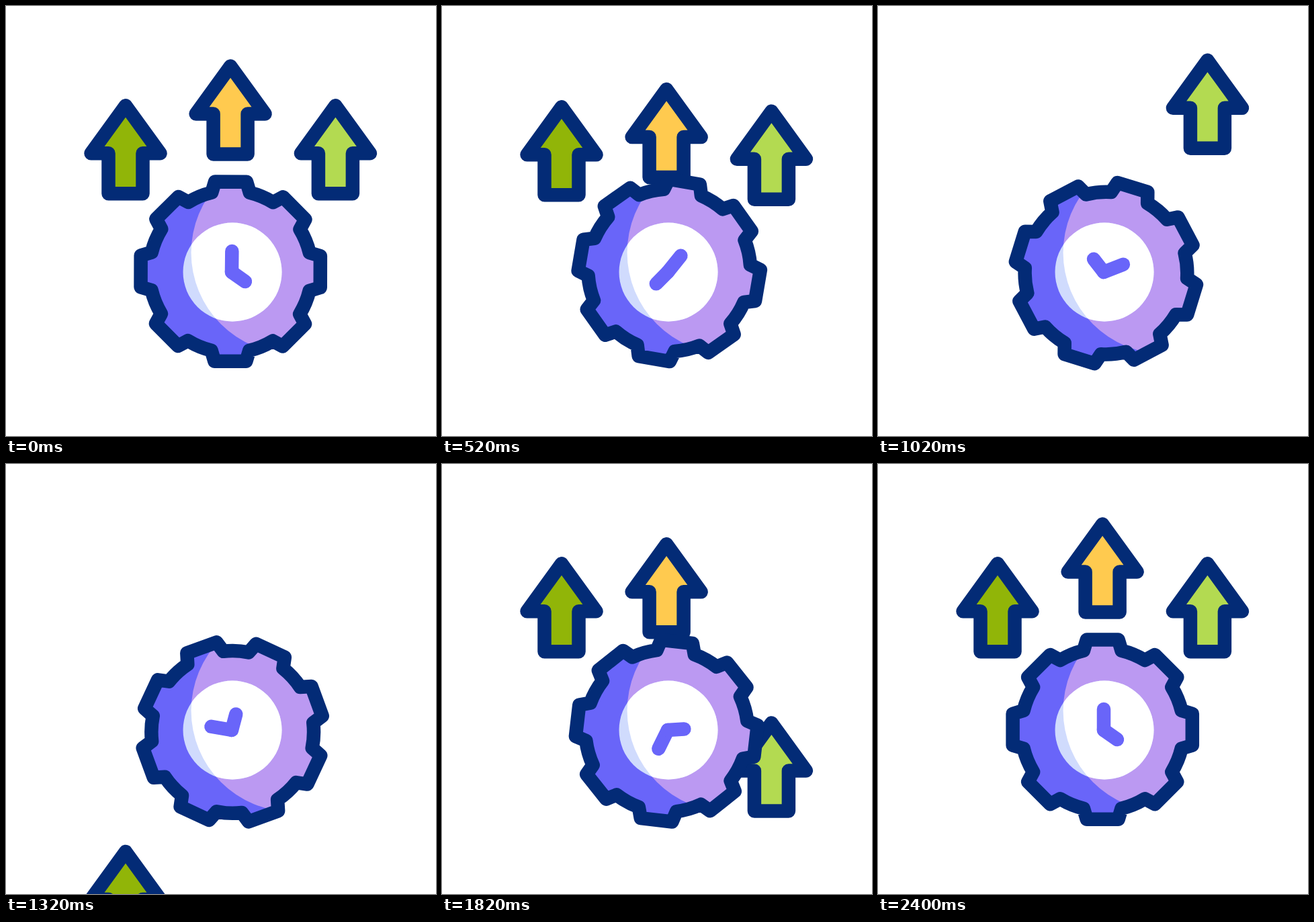
An HTML page that plays this animation: 640 px wide and 640 px high, repeating every 2.42 s.

```html
<!DOCTYPE html>
<html lang="en">
<head>
<meta charset="utf-8">
<title>Gear clock with rising arrows</title>
<style>
  html, body { margin: 0; width: 100%; height: 100%; overflow: hidden; background: #fff; }
  svg { display: block; width: 100%; height: 100%; }
  .line { stroke: #032b76; stroke-width: 20.5; stroke-linejoin: round; stroke-linecap: round; }
  .hand { fill: none; stroke: #6965f9; stroke-width: 20.5; stroke-linecap: round; }
</style>
</head>
<body>
<svg viewBox="0 0 640 640" xmlns="http://www.w3.org/2000/svg">
  <defs>
    <path id="arrow" d="M0 0L51.5 71H25.5V131H-25.5V71H-51.5Z"/>
    <path id="gear"/>
    <clipPath id="gearClip"><use href="#gear"/></clipPath>
    <clipPath id="lightClip"><circle cx="426" cy="367" r="150.4"/></clipPath>
  </defs>
  <use class="line arrow" href="#arrow" fill="#91b508"/>
  <use class="line arrow" href="#arrow" fill="#ffca4f"/>
  <use class="line arrow" href="#arrow" fill="#b3da51"/>
  <g clip-path="url(#gearClip)">
    <rect width="640" height="640" fill="#6965f9"/>
    <circle cx="426" cy="367" r="150.4" fill="#bb99f2"/>
  </g>
  <circle cx="337" cy="396" r="73.5" fill="#d0dbfd"/>
  <circle cx="337" cy="396" r="73.5" fill="#fff" clip-path="url(#lightClip)"/>
  <use class="line" href="#gear" fill="none"/>
  <path id="minute" class="hand" d="M336 396V365"/>
  <path id="hour" class="hand" d="M336 396L356 410"/>
</svg>
<script>
const LOOP = 2420, TURN = 2400, STAGGER = 200;
const DIP = 38.5, TOP = -306.5, BOTTOM = 580;
const $ = id => document.getElementById(id);
const arrows = [...document.querySelectorAll('.arrow')];
const homes = [[178, 148.3], [334.1, 89.5], [490.4, 148.3]];

// Cubic Bezier easing, solved by bisection
function bezier(x1, y1, x2, y2) {
  const at = (a, b, t) => 3 * (1 - t) ** 2 * t * a + 3 * (1 - t) * t * t * b + t ** 3;
  return u => {
    if (u <= 0) return 0;
    if (u >= 1) return 1;
    let lo = 0, hi = 1;
    for (let i = 0; i < 30; i++) {
      const mid = (lo + hi) / 2;
      if (at(x1, x2, mid) < u) lo = mid; else hi = mid;
    }
    return at(y1, y2, lo);
  };
}
const smooth = bezier(1 / 3, 0, 2 / 3, 1);
const spin = bezier(1 / 6, 1 / 6, 2 / 3, 1);
const arrive = bezier(0.65, 0, 0.335, 1);

function gearPath() {
  const tooth = [[-28.3, -117.5], [-23.5, -133.6], [23.5, -133.6], [28.3, -117.5]];
  let d = '';
  for (let k = 0; k < 8; k++) {
    const c = Math.cos(k * Math.PI / 4), s = Math.sin(k * Math.PI / 4);
    tooth.forEach(([x, y], i) => {
      const cmd = i ? 'L' : k ? 'A121 121 0 0 1 ' : 'M';
      d += cmd + (334.2 + x * c - y * s).toFixed(2) + ' ' + (395.2 + x * s + y * c).toFixed(2);
    });
  }
  return d + 'A121 121 0 0 1 305.9 277.7Z';
}

// Vertical offset of an arrow: dip, launch upwards, return from below
function lift(t) {
  if (t < 400) return DIP * smooth(t / 400);
  if (t < 1000) return DIP + (TOP - DIP) * smooth((t - 400) / 600);
  return BOTTOM * (1 - arrive((t - 1000) / 800));
}

function draw(t) {
  arrows.forEach((el, i) => {
    const [x, y] = homes[i];
    el.setAttribute('transform', `translate(${x} ${y + lift(t - i * STAGGER)})`);
  });
  const angle = 360 * spin(t / TURN);
  $('gear').setAttribute('transform', `rotate(${angle} 337 396)`);
  $('hour').setAttribute('transform', `rotate(${angle} 336 396)`);
  $('minute').setAttribute('transform', `rotate(${angle * 4} 336 396)`);
}

$('gear').setAttribute('d', gearPath());
const start = performance.now();
function tick(now) {
  draw(Math.max(0, now - start) % LOOP);
  requestAnimationFrame(tick);
}
draw(0);
requestAnimationFrame(tick);
</script>
</body>
</html>
```
